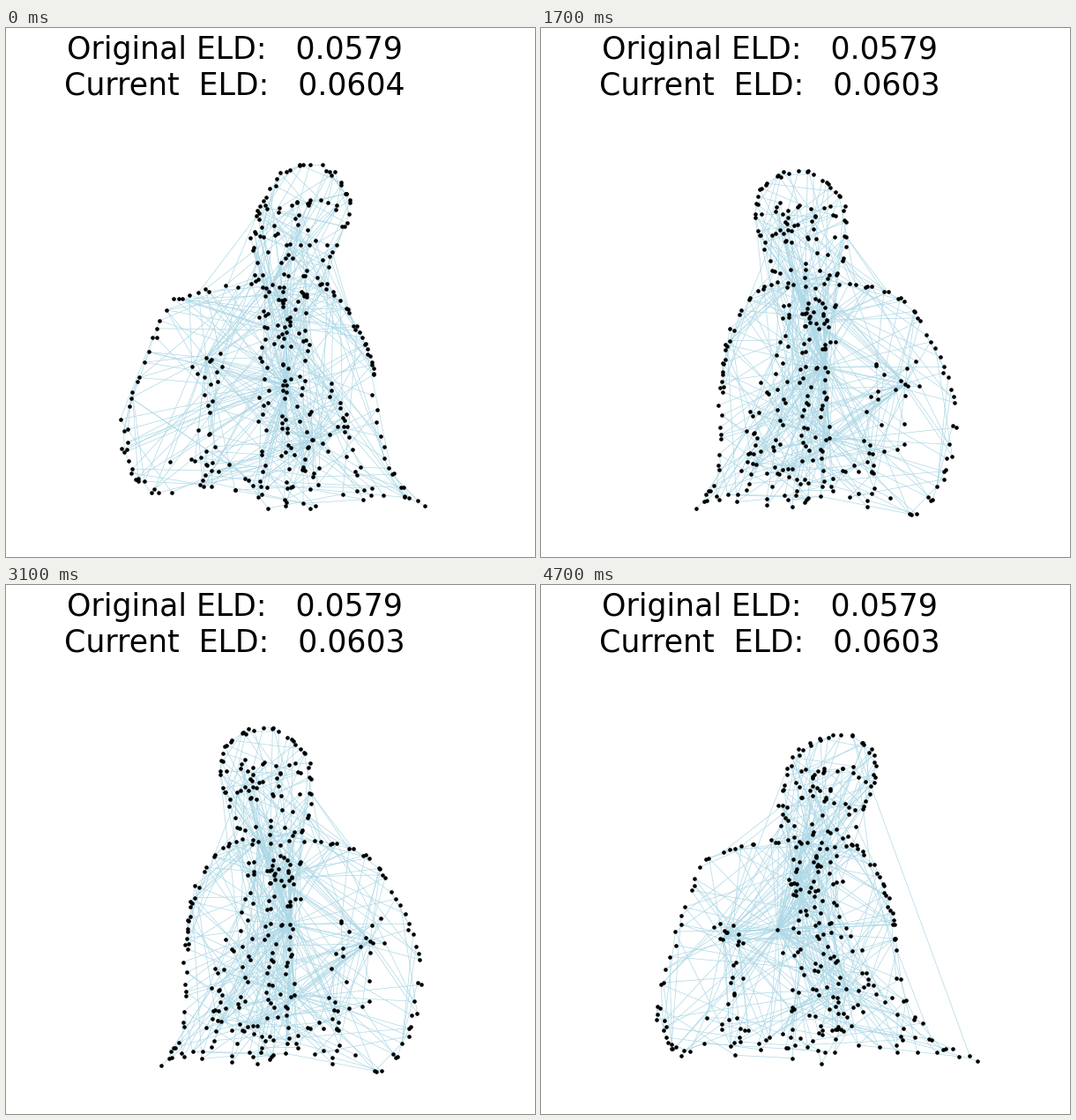
A matplotlib script that plays this animation: 600 by 600 pixels, repeating every 4.8 s.

```python
import numpy as np
import matplotlib.pyplot as plt
from matplotlib.animation import FuncAnimation
from matplotlib.collections import LineCollection

SIZE, FRAMES, STEP = 600, 48, 100
HALF = FRAMES // 2
LOW = {1, 2, 7, 10, 13, 17, 18, 22}  # steps with the lower reading

# joints of the figure (x, y) at a few key steps
KEYS = [0, 1, 8, 13, 17, 21]
JOINTS = dict(
    crown=[(345, 154), (337, 168), (288, 165), (265, 161), (290, 160), (304, 137)],
    neck=[(318, 285), (311, 287), (297, 290), (298, 287), (302, 285), (290, 270)],
    shoulder_l=[(184, 313), (183, 314), (203, 338), (186, 348), (213, 352), (185, 318)],
    cuff_l=[(133, 448), (133, 470), (170, 418), (176, 440), (205, 420), (182, 425)],
    hem_l=[(170, 526), (165, 532), (129, 542), (195, 512), (178, 543), (220, 556)],
    shoulder_r=[(396, 338), (386, 336), (385, 318), (404, 293), (418, 311), (399, 291)],
    cuff_r=[(417, 395), (402, 404), (381, 400), (458, 395), (469, 420), (490, 420)],
    hem_r=[(474, 541), (491, 538), (446, 530), (437, 508), (420, 550), (420, 560)],
    foot=[(318, 542), (316, 533), (318, 545), (301, 514), (297, 540), (268, 562)],
    core=[(318, 405), (268, 391), (285, 383), (288, 383), (322, 385), (322, 380)],
    side=[(227, 374), (206, 402), (217, 455), (405, 400), (413, 404), (447, 375)],
)


def bump(k, at):
    return np.exp(-(k - at) ** 2 / 2)


def rig(k):
    """Joint positions at step k, with the coat swinging out now and then."""
    j = {name: np.array([np.interp(k, KEYS, c) for c in zip(*pts)])
         for name, pts in JOINTS.items()}
    j["hem_r"][0] += 28 * bump(k, 3)
    j["hem_l"][0] -= 30 * bump(k, 6)
    for name in ("foot", "hem_l", "hem_r"):
        j[name][1] += 26 * (bump(k, 10) + bump(k, 23))
    return j


def mix(a, b, u):
    return a + (b - a) * u


def figure_dots(j, rng):
    dots = []

    def curve(n, a, b, ctrl=None, spread=1.5):
        """n uneven dots along a quadratic curve."""
        ctrl = mix(a, b, 0.5) if ctrl is None else np.array(ctrl)
        t = ((np.arange(n) + rng.uniform(-0.3, 1.3, n)) / n).clip(0, 1)[:, None]
        p = (1 - t) ** 2 * a + 2 * t * (1 - t) * ctrl + t ** 2 * b
        dots.append(p + rng.normal(0, spread, p.shape))

    def cloud(n, at, spread):
        dots.append(at + rng.normal(0, 1, (n, 2)) * spread)

    crown, neck, foot, core = j["crown"], j["neck"], j["foot"], j["core"]
    axis = neck - crown
    brow = crown + 0.36 * axis
    curve(14, brow - (44, -6), brow + (44, 6), brow - (0, 10), 5)
    cloud(22, crown + 0.6 * axis, (24, 15))

    for s, side in ((-1, "_l"), (1, "_r")):
        shoulder, cuff, hem = (j[n + side] for n in ("shoulder", "cuff", "hem"))
        base = neck + (32 * s, 4)
        curve(22, crown, base, crown + (82 * s, 16), 2)
        curve(11, base, shoulder, (mix(base, shoulder, 0.6)[0], base[1] + 3))
        curve(13, shoulder, cuff, mix(shoulder, cuff, 0.5) + (5 * s, -5))
        curve(15, cuff, hem, (cuff[0], mix(cuff, hem, 0.85)[1]), 2.5)
        # folds, forearm and lower edge
        curve(17, mix(shoulder, core, 0.38) + (0, 35), mix(hem, foot, 0.38), spread=5)
        curve(12, mix(cuff, foot, 0.3), mix(cuff, foot, 0.85), spread=7)
        curve(8, hem, foot, mix(hem, foot, 0.5) - (0, 25), 5)

    # front edges of the coat, running down from the chin
    for n, dx in ((30, -29), (42, 0), (34, 23)):
        top = neck + (0.8 * dx, -20)
        curve(n, top, foot + (dx, -4), mix(top, foot + (dx, 0), 0.5), 4.5)
    cloud(14, mix(neck, core, 0.4), (16, 26))
    cloud(7, j["side"], (9, 12))
    return np.vstack(dots)


def graph(k):
    rng = np.random.default_rng(40 + k)
    j = rig(k)
    dots = figure_dots(j, rng)
    hubs = [  # position, links, how far they reach
        (j["core"], 80, 80),
        (j["side"], 30, 80),
        (j["foot"] + (30, -75), 42, 60),
        (j["neck"] + (-16, 6), 32, 60),
        (mix(j["neck"], j["core"], 0.5), 32, 60),
    ]
    p = np.vstack([dots] + [h[0] for h in hubs])

    def fan(i, n, reach):
        w = np.exp(-np.hypot(*(p - p[i]).T) / reach)
        w[i] = 0
        return [(p[i], p[m]) for m in rng.choice(len(p), n, False, w / w.sum())]

    links = [e for i, (_, n, reach) in enumerate(hubs, len(dots)) for e in fan(i, n, reach)]
    links += [e for i in range(len(dots)) for e in fan(i, 1, 60)]
    return p, links


fig = plt.figure(figsize=(SIZE / 100, SIZE / 100), dpi=100, facecolor="white")
ax = fig.add_axes([0, 0, 1, 1])
ax.set(xlim=(0, SIZE), ylim=(SIZE, 0))
ax.axis("off")

edges = LineCollection([], colors="lightblue", linewidths=0.5, zorder=1)
ax.add_collection(edges)
nodes, = ax.plot([], [], "o", color="black", ms=3.3, mew=0, zorder=2)
font = dict(family="DejaVu Sans", size=25, ha="center", va="baseline")
ax.text(259.3, 35.5, "Original ELD:   0.0579", **font)
label = ax.text(259.3, 75.5, "", **font)


def draw(i):
    k = HALF - abs(HALF - i)  # there and back
    p, links = graph(k)
    edges.set_segments(links)
    nodes.set_data(p[:, 0], p[:, 1])
    label.set_text("Current  ELD:   " + ("0.0603" if k in LOW else "0.0604"))
    return edges, nodes, label


anim = FuncAnimation(fig, draw, frames=FRAMES, interval=STEP, repeat=True)
plt.show()
```
